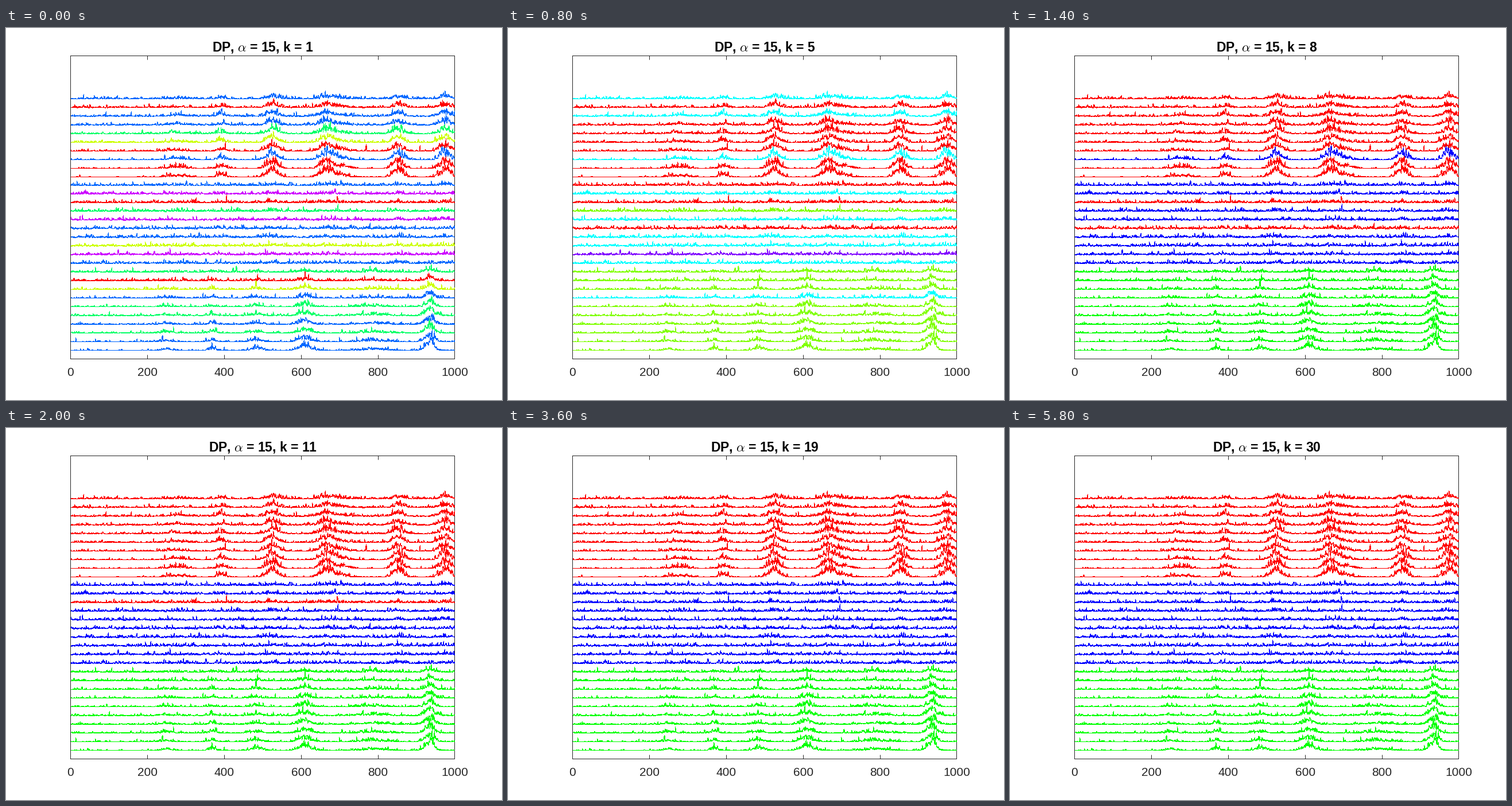
Animation of 864x648 px, one loop 6000 ms. Source, as a matplotlib script:

```python
import colorsys

import numpy as np
import matplotlib.pyplot as plt
from matplotlib.animation import FuncAnimation
from matplotlib.transforms import IdentityTransform

W, H, DPI = 864, 648, 100
STEPS, STEP_MS = 30, 200
LEFT, RIGHT, TOP, BOTTOM = 112, 781, 48, 576    # pixels of the box lines
ROWS, POINTS, Y_MAX = 30, 1000, 35
GRAIN, FLOOR = .085, .115                       # noise scale, flat level

plt.rcParams["font.family"] = "Liberation Sans"
plt.rcParams["mathtext.fontset"] = "cm"
plt.rcParams["path.simplify"] = False

# Bumps of the two topics: centre, width, height
UPPER = [(275, 22, .24), (392, 11, .4), (525, 14, 1), (666, 15, 1),
         (702, 20, .33), (852, 13, 1), (975, 14, 1)]
LOWER = [(250, 15, .17), (368, 10, .27), (483, 13, .32),
         (610, 15, .6), (790, 32, .2), (935, 12, 1)]

# Rows start in one of five clusters and settle in their block's own one
START = [int(c) for c in "303321030034024331432013223233"]
HOME = (0, 3, 2)
SETTLE = {2: (3, 4, 11, 14, 17, 21, 26, 28), 3: (5, 29), 5: (22,),
          6: (0, 2, 13, 18), 7: (23,), 8: (10,), 10: (7, 15), 16: (12,)}
SETTLED_AT = {row: step for step, rows in SETTLE.items() for row in rows}
STRAYS = (10, 15)    # these visit cluster 0 on the way


def pt(pixels):
    return pixels * 72 / DPI


def topic(bumps, x):
    return .008 + sum(h * np.exp(-((x - c) / s) ** 2 / 2) for c, s, h in bumps)


def make_traces():
    """Noisy rows, snapped to pixel centres for crisp one-pixel lines."""
    rng = np.random.default_rng(15)
    x = np.arange(1, POINTS + 1)
    topics = topic(UPPER, x), topic(UPPER, x), topic(LOWER, x)
    px = np.floor(LEFT + .5 + (RIGHT - LEFT) * x / POINTS) + .5
    traces = []
    for r in range(ROWS):
        block, rank = divmod(r, 10)
        mix = .08 if block == 1 else .33 + .65 * rank / 9
        mean = mix * topics[block] + (1 - mix) * FLOOR
        y = ROWS - r + rng.gamma(mean / GRAIN, GRAIN)
        py = np.floor(BOTTOM + .5 - (BOTTOM - TOP) * y / Y_MAX) + .5
        traces.append((px, H - py))
    return traces


def cluster(row, k):
    if k >= SETTLED_AT.get(row, STEPS + 1):
        return HOME[row // 10]
    return 0 if row in STRAYS and k > 1 else START[row]


def row_colors(k):
    """Hues are spread evenly over the clusters still in use."""
    labels = [cluster(r, k) for r in range(ROWS)]
    alive = sorted(set(labels))
    return [colorsys.hsv_to_rgb(alive.index(c) / len(alive), 1, 1)
            for c in labels]


fig = plt.figure(figsize=(W / DPI, H / DPI), dpi=DPI, facecolor="white")
ax = fig.add_axes([(LEFT + .4) / W, 1 - (BOTTOM + .4) / H,
                   (RIGHT - LEFT) / W, (BOTTOM - TOP) / H])
ax.set(xlim=(0, 1000), ylim=(0, Y_MAX), xticks=range(0, 1001, 200), yticks=[])
ax.tick_params(direction="in", top=True, length=pt(6.7), width=pt(1),
               color="0.15", labelbottom=False)
for spine in ax.spines.values():
    spine.set(linewidth=pt(1), edgecolor="0.15", zorder=1)

for i in range(6):
    fig.text(.13 + .775 * i / 5, 1 - 606 / H, str(200 * i), color="0.15",
             size=pt(20.83), ha="center", va="baseline")
title = fig.text(.13 + .775 / 2, 1 - 40 / H, "", color="black", weight="bold",
                 size=pt(22.9), ha="center", va="baseline")

lines = [ax.plot(*trace, lw=pt(.5), antialiased=False, snap=False,
                 clip_on=False, zorder=3 - r / ROWS,
                 transform=IdentityTransform())[0]
         for r, trace in enumerate(make_traces())]


def update(frame):
    k = frame + 1
    for line, color in zip(lines, row_colors(k)):
        line.set_color(color)
    title.set_text(rf"DP$\hspace{{0}}$, $\alpha$ = 15, k = {k}")
    return [*lines, title]


anim = FuncAnimation(fig, update, frames=STEPS, interval=STEP_MS,
                     repeat=True, repeat_delay=0, blit=False)
plt.show()
```
